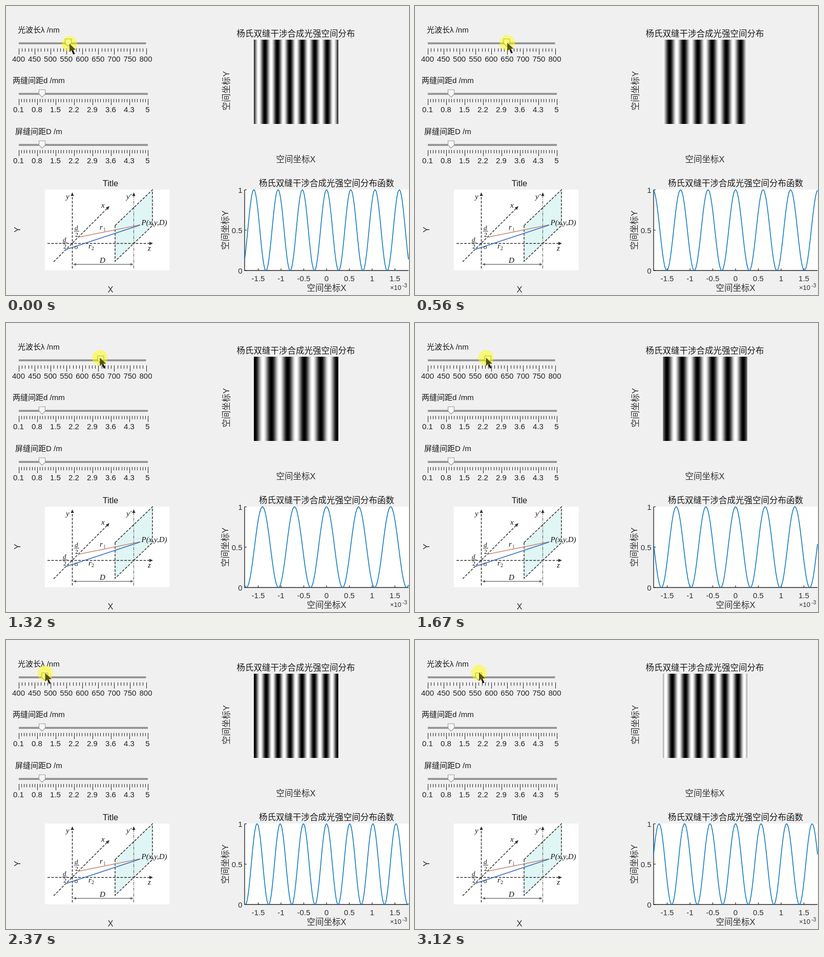
Write an HTML page with a canvas that moves like this. It is 787 px wide and 566 px high and loops after 3190 ms.

```html
<!DOCTYPE html>
<html lang="zh">
<head>
<meta charset="utf-8">
<title>双缝干涉</title>
<style>
html, body { margin: 0; width: 100%; height: 100%; overflow: hidden; background: #f0f0f0; }
canvas { display: block; }
</style>
</head>
<body>
<canvas id="stage" width="787" height="566"></canvas>
<script>
const ctx = document.getElementById('stage').getContext('2d');
const LOOP = 3190, STEP = LOOP / 46;
const SANS = '"Liberation Sans", "Noto Sans CJK SC", "Noto Sans CJK", sans-serif';
const SERIF = '"Liberation Serif", "Noto Serif", serif';
const INK = '#303030';

// [time, value] pairs
const pointerX = [[0, 124], [350, 153], [560, 181], [830, 201], [1000, 214], [1110, 209],
  [1320, 183], [1670, 138], [1960, 111], [2230, 78], [2300, 76.5], [2500, 77],
  [2780, 118], [2900, 125], [3190, 125]];
const pointerY = [[0, 74], [350, 74], [560, 72], [830, 69], [1110, 67], [1320, 68],
  [1960, 68], [2230, 64], [2370, 65], [2850, 63], [3190, 64]];
const thumbShift = [[0, -2.5], [350, -0.5], [830, -2.5], [1000, 0], [1320, 1.5],
  [1960, 5], [2370, -1], [3190, -0.5]];
const wavelength = [[0, 532], [350, 560], [560, 605], [830, 661.5], [1180, 710], [1320, 703],
  [1670, 650], [1960, 600], [2370, 505.5], [2500, 484], [2640, 484], [3050, 560], [3190, 560]];

function at(keys, t) {
  let i = 1;
  while (i < keys.length - 1 && keys[i][0] < t) i++;
  const [t0, a] = keys[i - 1], [t1, b] = keys[i];
  return a + (b - a) * Math.min(1, Math.max(0, (t - t0) / (t1 - t0)));
}

function text(s, x, y, size, align = 'left', color = '#1a1a1a', font = SANS, style = '') {
  ctx.font = `${style} ${size}px ${font}`;
  ctx.textAlign = align;
  ctx.textBaseline = 'alphabetic';
  ctx.fillStyle = color;
  ctx.fillText(s, x, y);
}

function sideText(s, x, y, size) {
  ctx.save();
  ctx.translate(x, y);
  ctx.rotate(-Math.PI / 2);
  text(s, 0, 0, size, 'center', INK);
  ctx.restore();
}

const math = (s, x, y, size = 15) => text(s, x, y, size, 'left', '#111', SERIF, 'italic');

function trace(points, close) {
  ctx.beginPath();
  points.forEach(([x, y]) => ctx.lineTo(x, y));
  if (close) ctx.closePath();
}

function line(points, color, width, dash = [], close = false) {
  trace(points, close);
  ctx.setLineDash(dash);
  ctx.strokeStyle = color;
  ctx.lineWidth = width;
  ctx.stroke();
  ctx.setLineDash([]);
}

function shape(points, color) {
  trace(points, true);
  ctx.fillStyle = color;
  ctx.fill();
}

function box(x, y, w, h, color) {
  ctx.fillStyle = color;
  ctx.fillRect(x, y, w, h);
}

function arrowHead(x, y, angle, color = '#333', len = 7, half = 3.2) {
  ctx.save();
  ctx.translate(x, y);
  ctx.rotate(angle);
  shape([[0, 0], [-len, -half], [-len, half]], color);
  ctx.restore();
}

function thumb(x, y, fill, edge) {
  const p = [[x - 6, y], [x + 6, y], [x + 6, y + 8.5], [x, y + 14.5], [x - 6, y + 8.5]];
  shape(p, fill);
  line(p, edge, 1.1, [], true);
}

function slider(name, nameX, y, width, labels, minor) {
  text(name, nameX, y - 21, 15);
  box(25, y - 2, width, 4, '#949494');
  box(25, y - 2, width, 1, '#a6a6a6');
  const n = (labels.length - 1) * minor;
  for (let i = 0; i <= n; i++) {
    const x = Math.round(25 + width * i / n);
    box(x, y + 10, 1, i % minor ? 6.5 : 12, '#222');
  }
  labels.forEach((s, i) => text(s, 24.5 + width * i / (labels.length - 1), y + 36, 15, 'center', '#222'));
}

function sliders() {
  const nm = [400, 450, 500, 550, 600, 650, 700, 750, 800];
  const ratio = [0.1, 0.8, 1.5, 2.2, 2.9, 3.6, 4.3, 5];
  slider('光波长λ /nm', 23, 73, 248.5, nm, 5);
  slider('两缝间距d /mm', 13, 172, 252, ratio, 7);
  slider('屏缝间距D /m', 18, 272, 252, ratio, 7);
  thumb(70.5, 164, '#f8f8f8', '#999');
  thumb(70.5, 264, '#f8f8f8', '#999');
}

function fraction(x, y) {
  math('d', x - 4, y - 2, 13);
  line([[x - 5, y], [x + 5, y]], '#222', 1);
  text('2', x, y + 10.5, 12, 'center', '#111', SERIF);
}

function diagram() {
  const dash = [5, 2.5], dark = '#333';
  text('Title', 204, 353, 16.5, 'center');
  text('X', 204, 561, 16.5, 'center', INK);
  sideText('Y', 28, 438, 16.5);
  box(76, 359.5, 243.5, 158, '#fff');

  const screen = [[213, 430], [286, 360], [286, 430], [213, 500]];
  shape(screen, '#e0f6f4');
  line(screen, dark, 1.5, dash, true);

  line([[129.5, 514], [129.5, 371]], dark, 1.5, dash);
  arrowHead(129.5, 365, -Math.PI / 2);
  line([[249.5, 514], [249.5, 371]], '#555', 1.1, [6, 2, 1.5, 2]);
  arrowHead(249.5, 365, -Math.PI / 2);
  line([[81, 465], [281, 465]], dark, 1.5, dash);
  arrowHead(287, 465, 0);
  line([[93, 501], [198, 396]], dark, 1.5, dash);
  arrowHead(202, 392, -Math.PI / 4);

  line([[141, 453], [262, 428.5]], '#c88672', 1.7);
  line([[117, 477], [262, 429]], '#376bc2', 1.7);
  line([[134, 506], [246, 506]], '#777', 1.3);
  arrowHead(131, 506, Math.PI, '#666', 6, 2.5);
  arrowHead(249, 506, 0, '#666', 6, 2.5);

  math('y', 117, 378);
  math("y'", 235, 378);
  math('x', 186, 395);
  math('z', 277, 479);
  math('P(x,y,D)', 264.5, 429);
  math('D', 183, 503);
  math('r', 183, 438);
  text('1', 190, 441, 10, 'left', '#555', SERIF);
  math('r', 161, 475);
  text('2', 167, 478, 10, 'left', '#111', SERIF);
  text('o', 137, 476, 13, 'center', '#111', SERIF);
  fraction(138, 441);
  fraction(115, 464);
}

// Two-beam intensity; x and period in units of 1e-3
const intensity = (x, period) => Math.cos(Math.PI * x / period) ** 2;

function fringes(period) {
  text('杨氏双缝干涉合成光强空间分布', 566, 60, 16.5, 'center');
  for (let i = 0; i < 165; i++) {
    const v = Math.round(255 * intensity((i - 82) / 45.8, period));
    box(484 + i, 66, 1, 165, `rgb(${v},${v},${v})`);
  }
  text('空间坐标X', 566, 306, 16.5, 'center', INK);
  sideText('空间坐标Y', 436, 166, 16.5);
}

function graph(period) {
  const left = 466, right = 786, top = 360, bottom = 518, mid = 626, unit = 89;
  text('杨氏双缝干涉合成光强空间分布函数', mid, 353, 16.5, 'center');
  box(left, top - 0.5, right - left, bottom - top + 0.5, '#fff');
  line([[left, top], [left, bottom], [right, bottom]], '#262626', 1.4);
  for (let v = 0; v <= 1; v += 0.5) {
    const y = bottom - v * (bottom - top);
    line([[left, y], [left + 4, y]], '#262626', 1.2);
    text(String(v), 461.5, y + 5.5, 15, 'right', INK);
  }
  for (let v = -1.5; v <= 1.5; v += 0.5) {
    const x = mid + v * unit;
    line([[x, bottom], [x, bottom - 4]], '#262626', 1.2);
    text(String(v), x, 538.5, 15, 'center', INK);
  }
  text('×10', 750, 556, 13, 'left', INK);
  text('-3', 774, 551, 10.5, 'left', INK);

  const curve = [];
  for (let x = left; x <= right; x++) {
    curve.push([x, bottom - (bottom - top) * intensity((x - mid) / unit, period)]);
  }
  ctx.lineJoin = 'round';
  line(curve, '#0072bd', 1.5);
  ctx.lineJoin = 'miter';
  text('空间坐标X', mid, 558, 16.5, 'center', INK);
  sideText('空间坐标Y', 434, 439, 16.5);
}

function pointer(x, y) {
  const arrow = [[0, 0], [0, 16], [3.8, 12.8], [7.6, 21], [10.4, 19.8], [6.8, 11.8], [11.8, 11.3]]
    .map(([dx, dy]) => [x + dx, y + dy]);
  shape(arrow, '#0c0c08');
  ctx.beginPath();
  ctx.arc(x, y, 15, 0, Math.PI * 2);
  ctx.fillStyle = 'rgba(255,255,0,0.5)';
  ctx.fill();
  ctx.globalAlpha = 0.4;
  shape(arrow, '#0c0c08');
  ctx.globalAlpha = 1;
}

function draw(now) {
  const t = Math.floor((now % LOOP + 5) / STEP) * STEP;
  const period = at(wavelength, t) / 1000;
  const x = at(pointerX, t);
  box(0, 0, 787, 566, '#f0f0f0');
  sliders();
  diagram();
  fringes(period);
  graph(period);
  thumb(x + at(thumbShift, t), 64.5, '#f4f4f4', '#707070');
  pointer(x, at(pointerY, t));
}

const start = performance.now();
function tick() {
  draw(performance.now() - start);
  requestAnimationFrame(tick);
}
tick();
</script>
</body>
</html>
```
